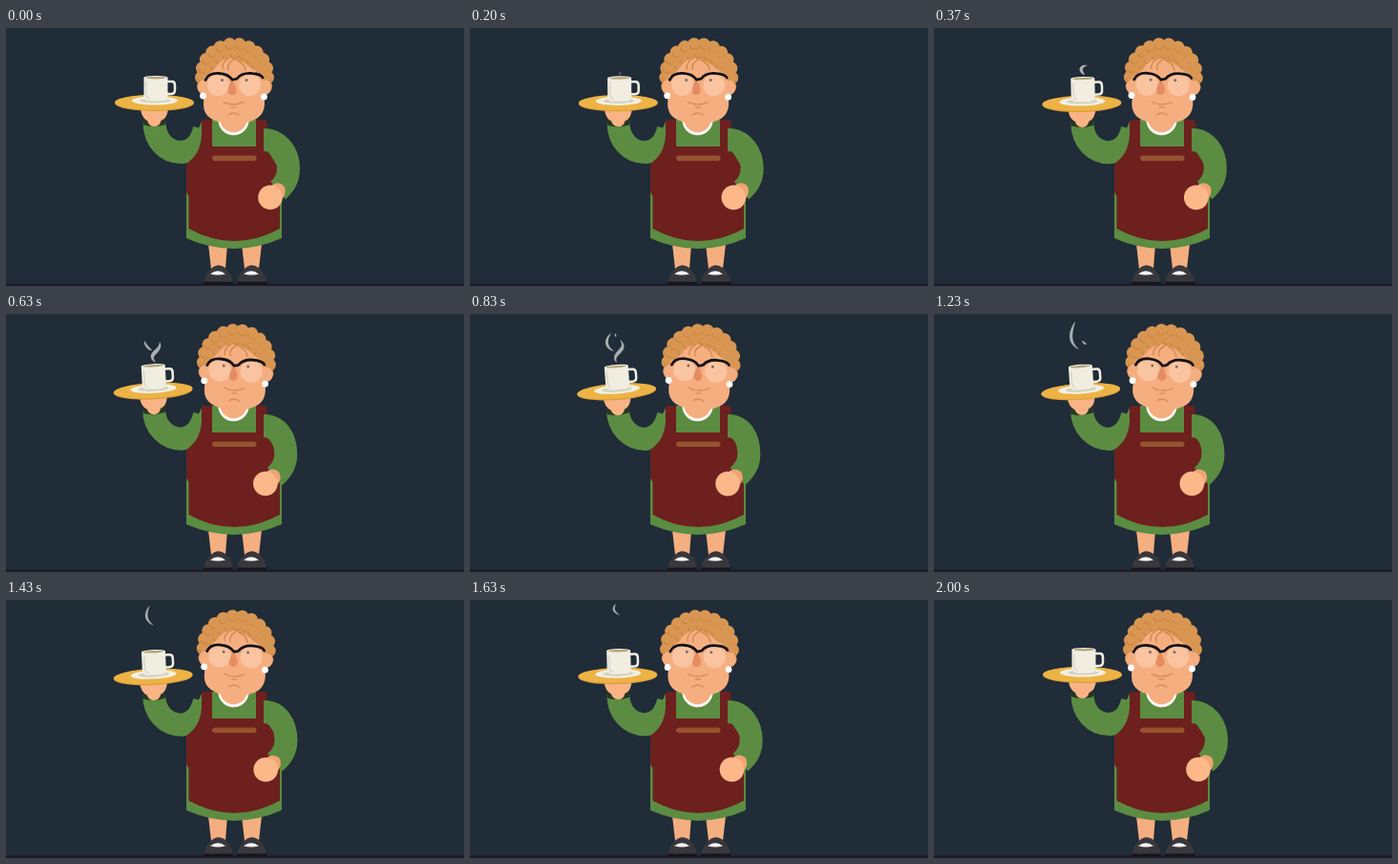
These frames come from a looping animation (480 by 270 pixels, 2030 ms). An HTML page:

```html
<!DOCTYPE html>
<html lang="en">
<head>
<meta charset="utf-8">
<title>Tea is served</title>
<style>
html, body { margin: 0; height: 100%; overflow: hidden; background: #202c38; }
svg { display: block; width: 100vw; height: 100vh; }
.line { fill: none; stroke-linecap: round; }
.sleeve { fill: none; stroke: #5b8c42; stroke-width: 24; }
</style>
</head>
<body>
<svg viewBox="0 0 480 270">
  <rect y="267.5" width="480" height="2.5" fill="#1c1a29"/>

  <path d="M212 226H232L230 252H215ZM247 226H268L265 252H250Z" fill="#f5ae80"/>
  <g id="shoe">
    <path d="M207 267Q208 258 215 252Q222 245 230 251Q237 257 238 267Z" fill="#38373c"/>
    <path d="M214 257.5Q222 251 230 257.5Q222 259.5 214 257.5Z" fill="#f7f5f2"/>
    <path d="M207 265.5H238V268H207Z" fill="#17151b"/>
  </g>
  <use href="#shoe" x="35"/>

  <path d="M206 96L197 115L189 142V220Q239 242 289 220V120L273 104L270 96Z" fill="#5b8c42"/>
  <path id="leftArm" class="sleeve"/>
  <path d="M205 96H216V124H262V96H273L274 106V128L284 144L287 178V210Q239 236 191.5 210V176L189 172V142Q204 132 205 112Z" fill="#6d201e"/>
  <rect x="216" y="133.5" width="46.5" height="5.5" rx="2.7" fill="#96532f"/>
  <circle cx="238.5" cy="96" r="16.2" fill="#fbf9f6"/>
  <circle cx="238.5" cy="95" r="14.2" fill="#f5ae80"/>

  <path id="rightArm" class="sleeve"/>
  <g id="rightHand">
    <path d="M279 164Q286 160 291 165Q295 171 290 178L280 180Z" fill="#f0a473"/>
    <circle cx="277" cy="177.3" r="12.8" fill="#fdb88a"/>
  </g>

  <g id="head">
    <g id="hair" fill="#d99652">
      <ellipse cx="239.5" cy="50" rx="34" ry="33"/>
    </g>
    <g fill="#f5ae80">
      <ellipse cx="206.5" cy="62" rx="5.5" ry="7.5"/>
      <ellipse cx="272.5" cy="62" rx="5.5" ry="7.5"/>
      <path d="M208 51Q217 46 222 38Q231 29 239 33Q250 35 257 42Q264 46 270 51L271 80Q270 100 239 100Q207 100 207 80Z"/>
    </g>
    <path class="line" d="M233 32Q226 36 227 43M239 33Q231 37 233 44M242 34Q250 37 251 44" stroke="#c98444" stroke-width="1.2"/>
    <circle cx="206.5" cy="71" r="3.4" fill="#fff"/>
    <circle cx="270.5" cy="72" r="3.4" fill="#fff"/>
    <g fill="#fbc4a0">
      <circle cx="222.5" cy="59.5" r="11.5"/>
      <circle cx="255.5" cy="59.5" r="11.5"/>
    </g>
    <g fill="#7d6a60">
      <circle cx="226.5" cy="54.5" r="1.5"/>
      <circle cx="252" cy="54.5" r="1.5"/>
    </g>
    <path d="M237 54Q240 58 241.5 65Q241 70 237 70Q232.5 70 232.5 65Q234 58 237 54Z" fill="#e58d61"/>
    <path class="line" d="M209 54.5Q212 47 223 47.5Q233 48 237 54Q240 54 242 53Q247 46.5 258 47.5Q267 48 269 52" stroke="#131216" stroke-width="2.8"/>
    <path class="line" d="M228 77.5Q238 82.5 249 77.5M233 91Q238.5 87 244 91M236 83H241" stroke="#dd8d5c" stroke-width="1.4"/>
  </g>

  <g id="tray">
    <path d="M143.5 95Q155 100 167.5 95V101Q155 105 143.5 101Z" fill="#263624"/>
    <path d="M141 84H170Q169 95 162.5 97Q161 103 155.5 103Q150 103 148 97Q142 94 141 84Z" fill="#f9b385"/>
    <ellipse cx="155.5" cy="78.6" rx="41.5" ry="8.4" fill="#d99d36"/>
    <ellipse cx="155.5" cy="77.8" rx="41.5" ry="8" fill="#edb345"/>
    <ellipse cx="156" cy="76" rx="24" ry="4.6" fill="#f2f0e4"/>
    <ellipse cx="156" cy="76" rx="16" ry="2.6" fill="#d5d1bf"/>
    <path class="line" d="M168 56H174Q177 56 177 60V65Q177 69 173 69H168" stroke="#f0ede1" stroke-width="2.5"/>
    <path d="M144.5 52H169.5V71Q169 76.5 164 76.5H150Q145 76.5 144.5 71Z" fill="#f0ede1"/>
    <path class="line" d="M147 57V70Q147.5 73 150 74" stroke="#d8d4c3" stroke-width="1.3"/>
    <ellipse cx="157" cy="52" rx="12.5" ry="2" fill="#f7f5eb"/>
    <ellipse cx="157" cy="52.2" rx="10.8" ry="1.2" fill="#b5a377"/>
  </g>

  <path id="steam" fill="#a8adae"/>
</svg>
<script>
const LOOP = 2030;
const $ = id => document.getElementById(id);
const mix = (a, b, u) => a + (b - a) * u;

// Ring of curls with a darker crease in each
function addCurls(count, rx, ry, r, from, to) {
  for (let i = 0; i < count; i++) {
    const a = mix(from, to, i / (count - 1)) * Math.PI / 180;
    const x = 239.5 + rx * Math.cos(a), y = 50 + ry * Math.sin(a);
    $('hair').insertAdjacentHTML('beforeend',
      `<circle cx="${x}" cy="${y}" r="${r}"/>
       <path class="line" stroke="#c98444" stroke-width="1.1"
         d="M${x - r * .6} ${y + 1}a${r * .6} ${r * .6} 0 0 0 ${r * 1.1} 2"/>`);
  }
}
addCurls(14, 34.5, 33, 7, 160, 380);
addCurls(9, 25, 23, 6, 190, 350);

// A wisp grows from its first foot and shrinks into its last tip.
// Key: time, thickness, then a cubic curve from foot to tip.
function wisp(born, gone, ...keys) {
  const point = (t, x, y) => [t, 0, x, y, x, y, x, y, x, y];
  return [point(born, ...keys[0].slice(2, 4)), ...keys, point(gone, ...keys.at(-1).slice(8))];
}
const mainWisp = wisp(150, 1400,
  [370, 3.5, 158, 49, 154, 46, 151, 40, 161, 39],
  [630, 4.2, 157, 51, 146, 41, 164, 40, 161, 29],
  [830, 3.8, 154, 51, 146, 41, 168, 38, 157, 27],
  [1230, 2, 160, 32, 158, 31, 157, 30, 155, 28]);
const sideWisp = wisp(480, 1850,
  [630, 2.6, 153, 38, 150, 37, 146, 33, 145, 28],
  [830, 3, 151, 39, 142, 35, 141, 27, 148, 20],
  [1230, 3.2, 152, 37, 140, 30, 143, 18, 148, 8],
  [1630, 2.2, 157, 16, 150, 12, 149, 9, 153, 4]);
const puff = wisp(740, 960, [830, 1.6, 153, 24, 153, 23, 152, 22, 152, 20]);

function wispPath(keys, t) {
  const i = keys.findIndex(k => k[0] > t);
  if (i < 1) return '';
  const a = keys[i - 1], b = keys[i], u = (t - a[0]) / (b[0] - a[0]);
  const [, w, ...p] = a.map((v, j) => mix(v, b[j], u));
  const bez = (s, c) => (1 - s) ** 3 * p[c] + 3 * s * (1 - s) ** 2 * p[2 + c]
    + 3 * s * s * (1 - s) * p[4 + c] + s ** 3 * p[6 + c];
  const left = [], right = [];
  for (let n = 0; n <= 20; n++) {
    const s = n / 20, x = bez(s, 0), y = bez(s, 1);
    const dx = bez(s + .01, 0) - bez(s - .01, 0), dy = bez(s + .01, 1) - bez(s - .01, 1);
    const taper = Math.max(0, Math.sin(Math.PI * s)) ** .7;
    const h = w / 2 * taper / (Math.hypot(dx, dy) || 1);
    left.push([x - dy * h, y + dx * h]);
    right.unshift([x + dy * h, y - dx * h]);
  }
  return 'M' + left.concat(right).join('L') + 'Z';
}

function draw() {
  const t = performance.now() % LOOP;
  const k = (1 - Math.cos(2 * Math.PI * t / LOOP)) / 2;
  $('head').setAttribute('transform', `rotate(${3 * k} 238 104)`);
  $('tray').setAttribute('transform', `translate(${-2 * k} ${3.2 * k}) rotate(${-4.5 * k} 155.5 78)`);
  $('rightHand').setAttribute('transform', `translate(${-7.5 * k} ${.3 * k})`);
  const wrist = 155.5 - .5 * k, elbow = 130 + k, x = 296 - 4 * k;
  $('leftArm').setAttribute('d',
    `M${wrist} ${98 + 2.5 * k}C${wrist} 118 168 ${elbow} 184 ${elbow}C196 129 204 122 208 106`);
  $('rightArm').setAttribute('d',
    `M270 117C285 117 ${x} 130 ${x} 147C${x} 158 ${291 - 5 * k} 165 ${285 - 5 * k} 170`);
  $('steam').setAttribute('d', [mainWisp, sideWisp, puff].map(w => wispPath(w, t)).join(''));
  requestAnimationFrame(draw);
}
draw();
</script>
</body>
</html>
```
